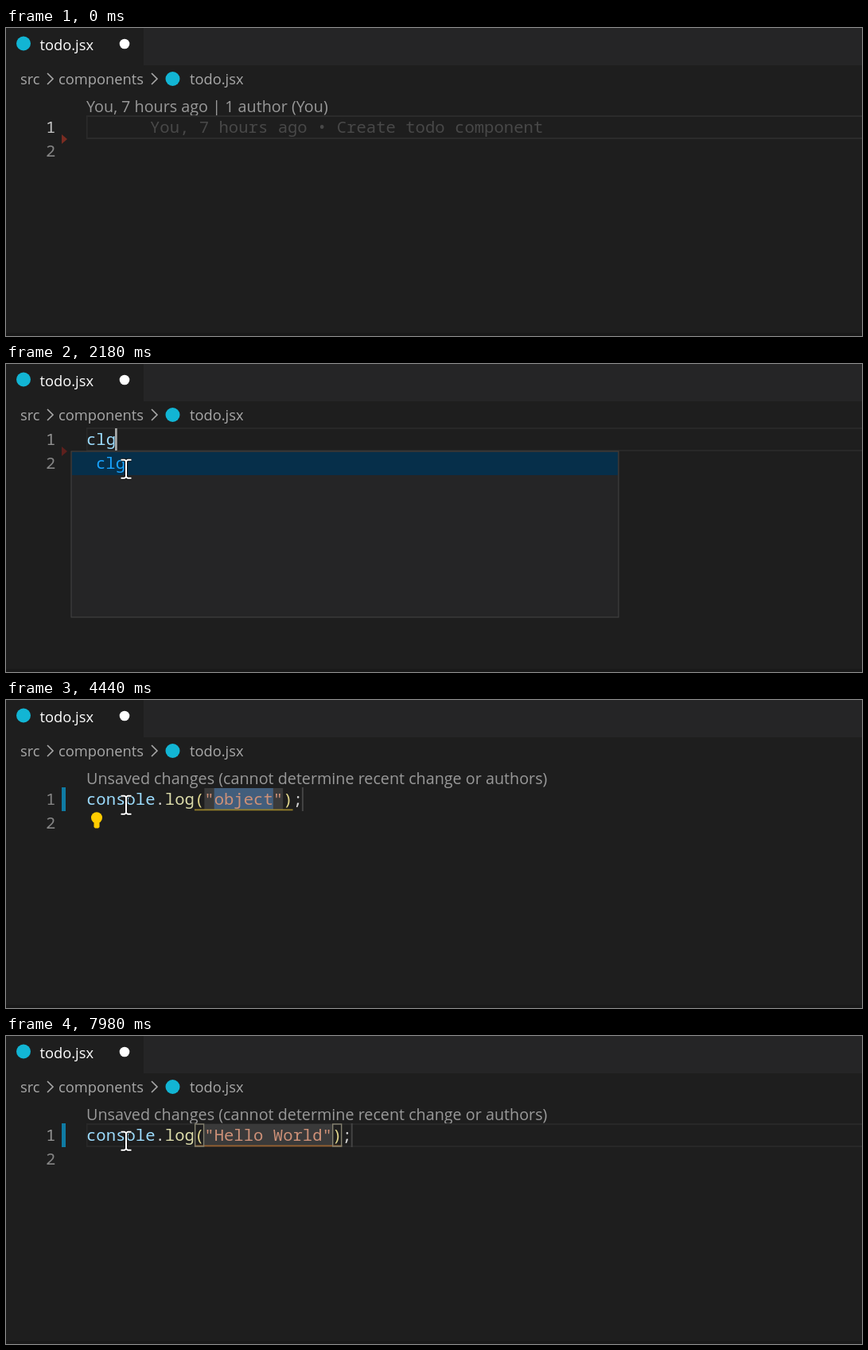
An HTML page for the animation above (8000 ms loop, 1076 by 388 pixels).

```html
<!DOCTYPE html>
<html lang="en">
<head>
<meta charset="utf-8">
<title>todo.jsx</title>
<style>
html, body { margin: 0; width: 100%; height: 100%; overflow: hidden; background: #1e1e1e; }
svg { display: block; width: 1076px; height: 388px; }
text { white-space: pre; }
.ui { font: 18.3px "Open Sans", "Noto Sans", sans-serif; }
.lens { font: 19.75px "Open Sans", "Noto Sans", sans-serif; fill: #999; }
.code { font: 20.6px "Noto Sans Mono", "DejaVu Sans Mono", monospace; }
</style>
</head>
<body>
<svg viewBox="0 0 1076 388">
  <rect width="1076" height="388" fill="#1e1e1e"/>
  <rect x="173" width="903" height="47" fill="#252526"/>
  <rect y="384" width="1076" height="4" fill="#191919"/>
  <circle cx="22" cy="19.5" r="9" fill="#12b5d4"/>
  <circle cx="209.5" cy="64" r="9" fill="#12b5d4"/>
  <circle cx="149" cy="20" r="6.3" fill="#fff"/>
  <g class="ui" fill="#a9a9a9">
    <text x="42.5" y="28" fill="#fff">todo.jsx</text>
    <text x="18" y="71">src</text>
    <text x="66" y="71">components</text>
    <text x="231" y="71">todo.jsx</text>
  </g>
  <path d="M52 57l7 7-7 7M183 57l7 7-7 7" fill="none" stroke="#a9a9a9" stroke-width="1.6"/>
  <g id="editor"></g>
  <g id="mouse">
    <path id="beam" d="M-6.5-11.5h4.5l2 1.5 2-1.5h4.5M0-10v20M-6.5 11.5h4.5l2-1.5 2 1.5h4.5" fill="none"
      stroke="#111" stroke-width="4"/>
    <use href="#beam" style="display:none"/>
    <path d="M-6.5-11.5h4.5l2 1.5 2-1.5h4.5M0-10v20M-6.5 11.5h4.5l2-1.5 2 1.5h4.5" fill="none"
      stroke="#fff" stroke-width="2"/>
  </g>
</svg>
<script>
const LOOP = 8000, X0 = 101, CW = 12.36, ROW = 30;
const editor = document.getElementById('editor');
const mouse = document.getElementById('mouse');

const EXPAND = 2430, LENS_BACK = 2505, QUOTE = 3930;
const KEYS = [4550, 4700, 4870, 5010, 5570, 5940, 6250, 6880, 6960, 7180, 7500];
const HELLO = 'Hello World';
const CARET_OFF = [[0, 70], [500, 1020], [1400, 1800], [3060, 3520], [4440, 4550],
  [5470, 5570], [6710, 6880], [7980, 8000]];

const within = (t, a, b) => t >= a && t < b;
const col = n => X0 + n * CW;
const rect = (x, y, w, h, fill, extra = '') =>
  `<rect x="${x}" y="${y}" width="${w}" height="${h}" fill="${fill}" ${extra}/>`;
const text = (x, y, cls, fill, s) =>
  `<text class="${cls}" x="${x}" y="${y}"${fill ? ` fill="${fill}"` : ''}>${s}</text>`;
const span = (fill, s) => `<tspan fill="${fill}">${s}</tspan>`;

function lineBox(y, color) {
  return rect(X0, y, 975, 2, color) + rect(X0, y + 28, 975, 2, color) + rect(X0, y, 1.5, ROW, color);
}

function numbers(y, first) {
  return text(50, y + 22, 'code', first, '1') + text(50, y + 52, 'code', '#858585', '2');
}

function marker(y, color) {
  return `<path d="M70 ${y + 24}l7 6-7 6z" fill="${color}"/>`;
}

function popup(height, right) {
  const x = 82;
  return rect(x, 110, right - x, height, '#252526', 'stroke="#454545"') +
    rect(x + 1, 111, right - x - 2, ROW - 1, '#062f4a') +
    text(X0 + 12, 132, 'code', '#18a3ff', 'clg');
}

function bulb() {
  return '<circle cx="114" cy="148.3" r="7" fill="#fc0"/>' +
    '<path d="M110.5 152h7v8l-1.5 1.5h-4l-1.5-1.5z" fill="#fc0"/>';
}

function before(t) {
  return text(X0, 106, 'lens', '', 'You, 7 hours ago | 1 author (You)') +
    lineBox(110, '#2b2b2b') + numbers(110, '#c6c6c6') + marker(110, '#7a2c22') +
    text(181, 132, 'code', '#484848', 'You, 7 hours ago • Create todo component');
}

function prefix(t) {
  const typed = t < 1950 ? 'c' : t < 2180 ? 'cl' : 'clg';
  return lineBox(80, '#282828') + numbers(80, '#929292') + marker(80, '#5e201d') +
    text(X0, 102, 'code', '#9cdcfe', typed) +
    (t < 2030 ? '' : t < 2180 ? popup(290, 770) : popup(209, 770));
}

function snippet(t) {
  const y = t < LENS_BACK ? 80 : 110;
  const count = KEYS.filter(k => t >= k).length;
  const quoted = t >= QUOTE;
  const word = count ? HELLO.slice(0, count) : 'object';
  const arg = quoted ? `"${word}"` : word;
  const close = 12 + arg.length;
  const wordCol = quoted ? 13 : 12;
  const end = col(close + 2);
  let s = '';

  if (y === 110) {
    s += text(X0, 106, 'lens', '', 'Unsaved changes (cannot determine recent change or authors)');
  }
  if (count) s += lineBox(y, '#282828');
  s += numbers(y, count ? '#949494' : '#858585') + rect(70, y, 5, ROW, '#0f7ba3');
  s += rect(col(12), y + 1, arg.length * CW, 27, '#3a3a3a');
  if (!count) s += rect(col(wordCol), y + 1, word.length * CW, 27, '#425e7c');
  s += rect(col(11), y + 27.5, (arg.length + 2) * CW, 1.8, count ? '#96602f' : '#96802a');
  if (count) {
    for (const c of [11, close]) {
      s += rect(col(c) + .7, y + 1, CW - 1.4, 28, 'none', 'stroke="#858270" stroke-width="1.4"');
    }
  }
  s += rect(end - 1, y, 2, ROW, '#434343');
  s += text(X0, y + 22, 'code', '#d4d4d4',
    span('#9cdcfe', 'console') + '.' + span('#dcdcaa', 'log') + span('#e0d68c', '(') +
    span(quoted ? '#ce9178' : '#9cdcfe', arg) + span('#e0d68c', ')') + ';');
  if (within(t, 3060, QUOTE) || within(t, 4150, 4550)) s += bulb();
  return s;
}

function caret(t) {
  if (CARET_OFF.some(([a, b]) => within(t, a, b))) return '';
  const count = KEYS.filter(k => t >= k).length;
  let n = 0, y = 110;
  if (t >= EXPAND) {
    n = t < QUOTE ? 18 : count ? 13 + count : 19;
    if (t < LENS_BACK) y = 80;
  } else if (t >= 1800) {
    n = t < 1950 ? 1 : t < 2180 ? 2 : 3;
    y = 80;
  }
  return rect(col(n) - 1, y + 1, 2.6, 28, '#aeafad');
}

function moveMouse(t) {
  mouse.style.display = t < 70 ? 'none' : '';
  // The pointer glides in by fixed steps, slowing down.
  const step = Math.floor((t - 70) / 76.6 + .01);
  const p = Math.max(0, Math.min(1, step / 6));
  const rest = (1 - p) ** 2;
  const settled = t >= 1020;
  const x = settled ? 151 : 150 + 540 * rest;
  const y = settled ? 132.3 : 134.3 + 153 * rest;
  mouse.setAttribute('transform', `translate(${x} ${y})`);
}

let shown = '';
function draw(t) {
  const body = t < 1800 ? before(t) : t < EXPAND ? prefix(t) : snippet(t);
  const next = body + caret(t);
  if (next !== shown) editor.innerHTML = shown = next;
  moveMouse(t);
}

const start = performance.now();
function tick() {
  draw((performance.now() - start) % LOOP);
  requestAnimationFrame(tick);
}
draw(0);
requestAnimationFrame(tick);
</script>
</body>
</html>
```
